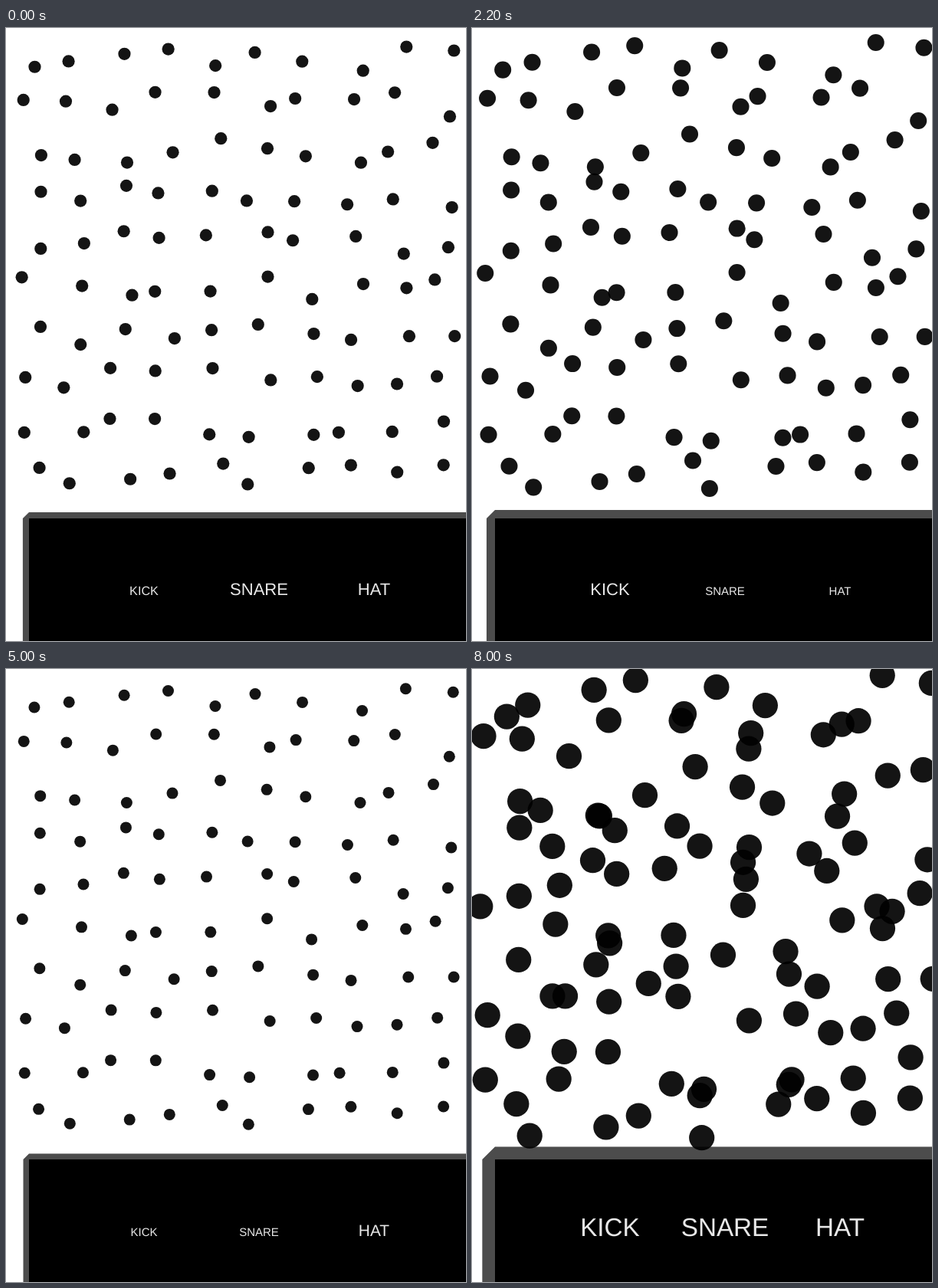
Write an HTML page that moves like this. It is 600 by 800 pixels and loops after 8.1 s.

```html
<!DOCTYPE html>
<html lang="en">
<head>
<meta charset="utf-8">
<title>Beat dots</title>
<style>
  html, body { margin: 0; width: 100%; height: 100%; overflow: hidden; background: #fff; }
  svg { display: block; width: 600px; height: 800px; }
  text {
    font-family: "Liberation Sans", Arial, Helvetica, sans-serif;
    text-anchor: middle;
    text-rendering: geometricPrecision;
    fill: #e8e8e8;
  }
</style>
</head>
<body>
<svg id="stage" viewBox="0 0 600 800">
  <rect id="frame" x="30" y="640" width="700" height="300" fill="none" stroke="#4c4c4c" stroke-linejoin="bevel"/>
  <rect x="30" y="640" width="700" height="300"/>
  <g id="dots" fill="#000" fill-opacity="0.92"></g>
  <g id="labels"></g>
</svg>
<script>
const STEP = 100, STEPS = 81;
const REST = 15, PEAK = 35, DECAY = 0.95;

// Steps at which each drum fires; negative ones ring on into the loop start.
const drums = [
  { name: "KICK", x: 180, hits: [-15, 13, 73, 79] },
  { name: "SNARE", x: 330, hits: [-9, 79] },
  { name: "HAT", x: 480, hits: [-9, 40, 66, 67, 79] }
];

function add(parent, tag, attrs) {
  const node = document.createElementNS("http://www.w3.org/2000/svg", tag);
  for (const key in attrs) node.setAttribute(key, attrs[key]);
  return document.getElementById(parent).appendChild(node);
}

// 48-bit linear congruential generator, floats in [0, 1)
function makeRandom(seed) {
  const mul = 0x5DEECE66Dn, mask = (1n << 48n) - 1n;
  let state = (BigInt(seed) ^ mul) & mask;
  return () => {
    state = (state * mul + 0xBn) & mask;
    return Number(state >> 24n) / 2 ** 24;
  };
}

const random = makeRandom(0);
const dots = [];
for (let y = 40; y < 600; y += 60) {
  for (let x = 30; x < 600; x += 60) {
    const dx = random() * 2 - 1;
    const dy = random() * 2 - 1;
    dots.push({ x, y, dx, dy, node: add("dots", "circle", {}) });
  }
}

for (const drum of drums) {
  drum.node = add("labels", "text", { x: drum.x, y: 740 });
  drum.node.textContent = drum.name;
}

const frame = document.getElementById("frame");

function sizeAt(hits, step) {
  const last = hits.filter(hit => hit <= step).pop();
  return Math.max(REST, PEAK * DECAY ** (step - last));
}

function draw(time) {
  const step = Math.floor(time / STEP) % STEPS;
  for (const drum of drums) {
    drum.node.setAttribute("font-size", sizeAt(drum.hits, step));
  }
  const kick = sizeAt(drums[0].hits, step);
  frame.setAttribute("stroke-width", kick);
  for (const dot of dots) {
    dot.node.setAttribute("cx", dot.x + dot.dx * kick);
    dot.node.setAttribute("cy", dot.y + dot.dy * kick);
    dot.node.setAttribute("r", kick / 2);
  }
}

function tick() {
  draw(performance.now());
  requestAnimationFrame(tick);
}
tick();
</script>
</body>
</html>
```
